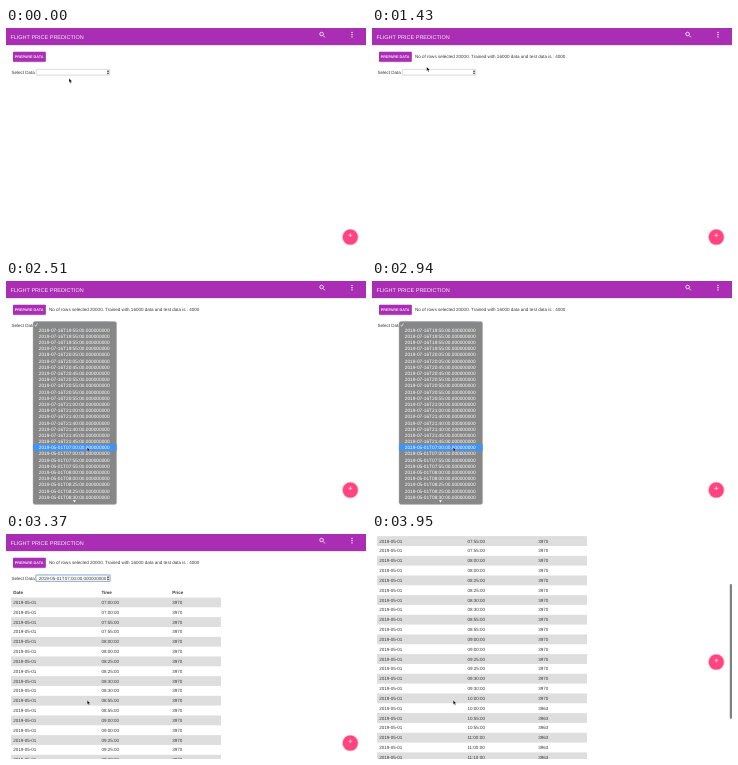
An HTML page for the animation above (3980 ms loop, 360 by 225 pixels).

```html
<!DOCTYPE html>
<html lang="en">
<head>
<meta charset="utf-8">
<title>Flight price prediction</title>
<style>
  html, body { margin: 0; width: 100%; height: 100%; overflow: hidden; background: #fff; }
  svg { display: block; width: 100vw; height: 100vh; }
  text {
    font: 4.54px "Liberation Sans", Arial, sans-serif;
    fill: #3a3a3a;
    white-space: pre;
    text-rendering: geometricPrecision;
  }
  .title { font-size: 5.5px; fill: #f6e8f8; }
  .button { font-size: 3.75px; font-weight: bold; fill: #f6e8f8; }
  .head { font-weight: bold; }
  .option { font-size: 4.76px; fill: #fff; }
</style>
</head>
<body>
<svg viewBox="0 0 360 225">
  <defs>
    <filter id="shadow" x="-30%" y="-30%" width="160%" height="170%">
      <feDropShadow dx="0" dy="0.4" stdDeviation="0.6" flood-color="#000" flood-opacity="0.25"/>
    </filter>
  </defs>
  <rect width="360" height="225" fill="#fff"/>
  <g id="page">
    <rect x="-4" y="-4" width="368" height="21" fill="#a92fb4" filter="url(#shadow)"/>
    <text class="title" x="4.4" y="10.5">FLIGHT PRICE PREDICTION</text>
    <g fill="none" stroke="#fff" stroke-width="0.8">
      <circle cx="315.6" cy="6" r="1.8"/>
      <path d="M317 7.4l2 2"/>
    </g>
    <g fill="#fff">
      <circle cx="346" cy="4.5" r="0.7"/>
      <circle cx="346" cy="6.7" r="0.7"/>
      <circle cx="346" cy="8.9" r="0.7"/>
    </g>
    <rect x="7" y="23.7" width="32.8" height="10" rx="0.8" fill="#a92fb4" filter="url(#shadow)"/>
    <text class="button" x="8.7" y="30.1">PREPARE DATA</text>
    <text id="message" x="43" y="30.2">No of rows selected 20000. Trained with 16000 data and test data is : 4000</text>
    <text x="5.4" y="45.8">Select Data</text>
    <rect id="ring" x="29.5" y="40.6" width="75" height="7.2" rx="1" fill="#6f9fe0"/>
    <rect x="30.2" y="41.3" width="73.6" height="5.8" rx="0.8" fill="#fff" stroke="#b5b5b5" stroke-width="0.5"/>
    <text id="value" x="32.7" y="45.8"></text>
    <path d="M100.9 43.7l1.1-1.7 1.1 1.7zM100.9 44.7l1.1 1.7 1.1-1.7z" fill="#222"/>
    <g id="table"></g>
    <circle cx="344.3" cy="209.1" r="8.4" fill="#ff4580" opacity="0.35"/>
    <circle cx="344.3" cy="209.1" r="7.5" fill="#ff4580"/>
    <path d="M342.4 207.3h3.8M344.3 205.4v3.8" stroke="#fff" stroke-width="0.7" opacity="0.85"/>
  </g>
  <rect id="thumb" x="357.8" width="2.2" height="135" rx="1.1" fill="#808080"/>
  <g id="menu">
    <rect x="27" y="40.6" width="83.6" height="182.8" rx="1.8" fill="#878787" stroke="#b4b4b4" stroke-width="0.5"/>
    <rect id="mark" x="27" width="83.6" height="6.6" fill="#3f94f7"/>
    <path d="M28.7 44l1 1.3 1.7-3" fill="none" stroke="#fff" stroke-width="0.6"/>
    <g id="options"></g>
    <path d="M67 219.3h3l-1.5 2.2z" fill="#fff"/>
  </g>
  <path id="cursor" d="M0 0v4.3l1-.9.7 1.7.8-.35-.7-1.6h1.4z" fill="#000" stroke="#fff" stroke-width="0.35"/>
</svg>
<script>
  const LOOP = 3980, TICK = 71.8;
  const MENU_Y = 49.1, MENU_STEP = 6.185;
  const TABLE_Y = 68.4, ROW = 9.83;
  const SHOW_MESSAGE = 11, OPEN_MENU = 23, CHOOSE = 43, SHOW_TABLE = 46;

  const $ = id => document.getElementById(id);
  const text = (x, y, s, cls = '') => `<text class="${cls}" x="${x}" y="${y}">${s}</text>`;
  const stamp = (day, time) => `${day}T${time}:00.000000000`;
  // "07:00*2" stands for two entries at 07:00
  const expand = list => list.split(' ').flatMap(part => {
    const [time, count] = part.split('*');
    return Array(+count).fill(time);
  });

  const july = expand('19:55*4 20:05*2 20:45*2 20:55*4 21:00*2 21:40*3 21:45*2');
  const may = expand('07:00*2 07:55*2 08:00*2 08:25*2 08:30*1');
  const options = [
    ...july.map(t => stamp('2019-07-16', t)),
    ...may.map(t => stamp('2019-05-01', t))
  ];
  $('options').innerHTML = options
    .map((s, i) => text(32.8, MENU_Y + i * MENU_STEP + 1.65, s, 'option')).join('');
  $('value').textContent = stamp('2019-05-01', '07:00');

  const flights = expand('07:00*2 07:55*2 08:00*2 08:25*2 08:30*2 08:55*2 09:00*2 ' +
    '09:25*2 09:30*2 10:00*2 10:55*2 11:00*2 11:10*2');
  const line = (y, cells, cls) =>
    [7.2, 95.4, 166.3].map((x, i) => text(x, y + 1.6, cells[i], cls)).join('');
  $('table').innerHTML = line(58, ['Date', 'Time', 'Price'], 'head') +
    flights.map((time, i) => {
      const y = TABLE_Y + i * ROW;
      const band = i % 2 ? '' :
        `<rect x="5" y="${y - ROW / 2}" width="210" height="${ROW}" fill="#dedede"/>`;
      return band + line(y, ['2019-05-01', time + ':00', i < 19 ? '3970' : '3963']);
    }).join('');

  // [tick, ...values]
  const path = [[0, 63, 50.3], [3, 46, 39], [7, 25, 28.5], [16, 25, 28.5],
    [20, 54.7, 38.8], [22, 57, 43], [25, 57, 46], [28, 56.5, 99.5],
    [32, 81, 165.5], [33, 81.2, 166.2]];
  const scrolling = [[52, 0], [53, 12], [54, 43], [55, 81]];
  const fading = [[42, 1], [43, 0.4], [44, 0.12], [45, 0]];

  function at(keys, n) {
    const j = keys.findIndex(k => k[0] > n);
    if (j < 0) return keys[keys.length - 1].slice(1);
    if (j === 0) return keys[0].slice(1);
    const a = keys[j - 1], b = keys[j], f = (n - a[0]) / (b[0] - a[0]);
    return a.slice(1).map((v, i) => v + (b[i + 1] - v) * f);
  }
  const show = (id, on) => $(id).setAttribute('visibility', on ? 'visible' : 'hidden');

  function draw(ms) {
    const n = Math.floor((ms % LOOP + 15) / TICK);
    const [x, y] = at(path, n), [scroll] = at(scrolling, n), [alpha] = at(fading, n);
    $('cursor').setAttribute('transform', `translate(${x} ${y})`);
    $('page').setAttribute('transform', `translate(0 ${-scroll})`);
    $('thumb').setAttribute('y', scroll * 0.6 + 1.3);
    $('menu').setAttribute('opacity', alpha);
    const row = Math.max(-1, Math.round((y - MENU_Y) / MENU_STEP));
    $('mark').setAttribute('y', MENU_Y + row * MENU_STEP - 3.4);
    show('message', n >= SHOW_MESSAGE);
    show('menu', n >= OPEN_MENU && alpha > 0);
    show('ring', n >= OPEN_MENU);
    show('value', n > CHOOSE);
    show('table', n >= SHOW_TABLE);
    show('thumb', scroll > 0);
  }

  const start = performance.now();
  function loop() {
    draw(performance.now() - start);
    requestAnimationFrame(loop);
  }
  loop();
</script>
</body>
</html>
```
